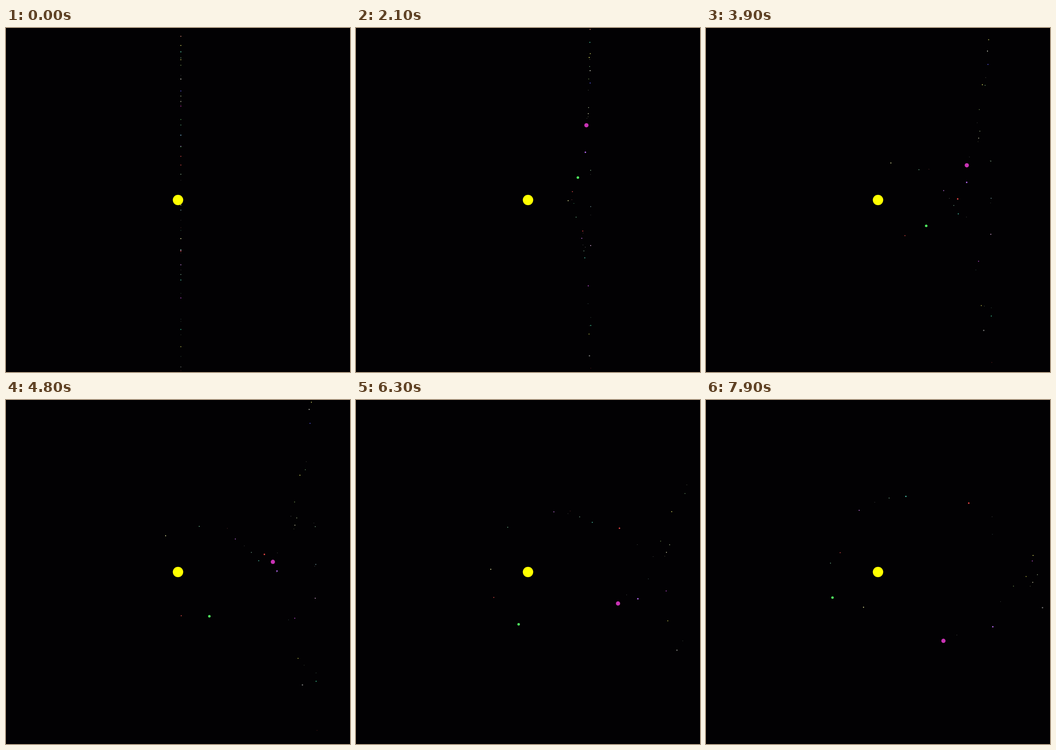
An HTML page for the animation above (8000 ms loop, 748x748 px).

```html
<!DOCTYPE html>
<html lang="en">
<head>
<meta charset="utf-8">
<title>Orbits</title>
<style>
html, body { margin: 0; width: 100%; height: 100%; overflow: hidden; background: #020103; }
svg { display: block; width: 100vw; height: 100vh; }
</style>
</head>
<body>
<svg viewBox="0 0 748 748"></svg>
<script>
const LOOP = 8000, STEP = 100, SPEED = 6.22, MID = 374;
const DOT = 1.05, DIM = 0.55, EATEN = 1800;
const svg = document.querySelector('svg');

// Bodies: [start y, colour, radius, later radius (0 = gone), time of that change].
// Pull 1 gives a circular orbit, 2/3 an ellipse of eccentricity 0.5.
const groups = [
  { focus: MID, pull: 1, bodies: [
    [38, '#d8d860'], [81, '#7a9a58', 0.9], [103, '#777', DIM],
    [157, '#777', DIM], [169.7, '#c832b4', DOT, 4.6, EATEN],
    [258, '#50f060', DOT, 2.7, EATEN], [279, '#d84848'],
    [385, '#d0d060', DOT, 0, 100], [458, '#f4f4a8'],
    [482, '#7cc8a0', 0.9], [515, '#c070e0'], [526, '#777', DIM],
    [536, '#78a890', 0.9], [548, '#50c8b0', DOT, 1.4, 7500],
    [633, '#688', DIM], [693, '#b0b048'], [737, '#707070', 0.9, 1.5, EATEN]
  ] },
  { focus: MID, pull: 2 / 3, bodies: [
    [50.5, '#887', DIM], [65, '#70a070', 0.9], [148, '#a8b890', 0.9],
    [160, '#c0c0a0'], [166, '#886', DIM], [233, '#b468f0', DOT, 1.6, EATEN],
    [434, '#a55', DIM, 0, 7500], [440, '#5b8', 0.6, 0, 3200],
    [485.5, '#f04848', DOT, 1.6, 3200], [489, '#855', DIM, 0, 3200],
    [514, '#777', DIM], [587, '#c050d8'], [667, '#676', DIM]
  ] },
  { focus: -MID, pull: 1, bodies: [
    [52, '#50d0b0'], [111, '#f0f0e0'], [137, '#5858e8'],
    [199, '#58a858', 0.9, 0, EATEN], [257, '#a858c0', 0.9, 0, EATEN],
    [331, '#666', DIM], [418, '#666', DIM], [483.5, '#d8a8d8'],
    [638, '#587868', DIM], [655.5, '#40c898']
  ] },
  { focus: -MID, pull: 2 / 3, bodies: [
    [18, '#e08878', DOT, 0, 3000], [69, '#c8c860'],
    [211, '#50a078', 0.9, 0, EATEN], [233, '#60b8c0', DOT, 0, EATEN],
    [298, '#d84848', DOT, 0, EATEN], [318, '#90b898', 0.9],
    [396, '#80a8b0', 0.9], [577, '#697', DIM, 0, EATEN],
    [714, '#697', DIM, 0, EATEN], [745, '#a03030', DIM]
  ] }
];

function addCircle(x, y, r, fill) {
  const el = document.createElementNS('http://www.w3.org/2000/svg', 'circle');
  const attrs = { cx: x, cy: y, r, fill };
  for (const key in attrs) el.setAttribute(key, attrs[key]);
  return svg.appendChild(el);
}

// Integrates an inverse-square orbit, one position per step.
function trace(startY, focus, pull) {
  let x = 0, y = startY - focus, vx = SPEED, vy = 0;
  const mass = pull * SPEED ** 2 * Math.abs(y);
  return Array.from({ length: LOOP / STEP }, () => {
    x += vx;
    y += vy;
    const k = mass / Math.hypot(x, y) ** 3;
    vx -= k * x;
    vy -= k * y;
    return [MID + x, focus + y];
  });
}

const bodies = groups.flatMap(({ focus, pull, bodies }) =>
  bodies.map(([y, color, r = DOT, laterR = r, change = LOOP]) => ({
    el: addCircle(MID, y, r, color),
    path: trace(y, focus, pull),
    r, laterR, change
  })));
addCircle(MID, MID, 11.3, '#ff0');

function render(time) {
  const frame = Math.floor(time / STEP);
  for (const { el, path, r, laterR, change } of bodies) {
    const [x, y] = path[frame];
    el.setAttribute('cx', x.toFixed(2));
    el.setAttribute('cy', y.toFixed(2));
    el.setAttribute('r', time < change ? r : laterR);
  }
}

const start = performance.now();
function tick() {
  render((performance.now() - start) % LOOP);
  requestAnimationFrame(tick);
}
tick();
</script>
</body>
</html>
```
